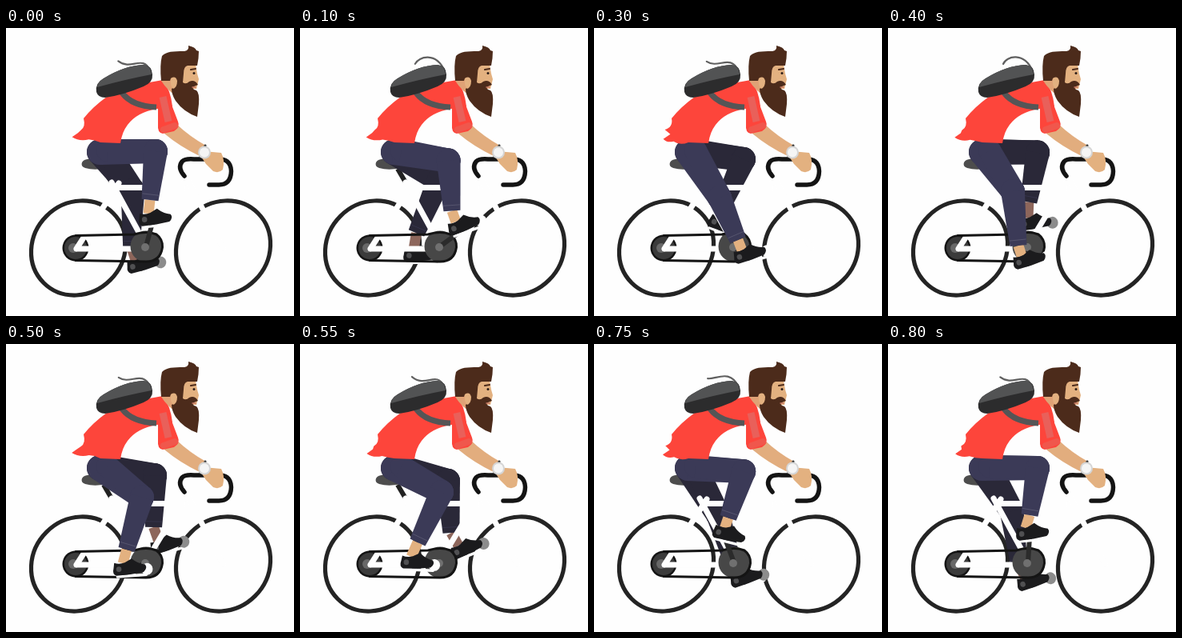
An HTML page with a canvas for the animation above (0.85 s loop, 360 px wide and 360 px high).

```html
<!DOCTYPE html>
<html lang="en">
<head>
<meta charset="utf-8">
<title>Cyclist</title>
<style>
  html, body { margin: 0; width: 100%; height: 100%; overflow: hidden; background: #fefefe; }
  canvas { display: block; }
</style>
</head>
<body>
<canvas id="stage" width="360" height="360"></canvas>
<script>
const ctx = document.getElementById('stage').getContext('2d');
const LOOP = 850, STEP = 50, TAU = Math.PI * 2;
const WHITE = '#fefefe', BLACK = '#141414', RED = '#fd453b', SKIN = '#e3b180', HAIR = '#4c2b1b';
const CRANK = { x: 175, y: 273 };

// time, knee x y, hem x y, shoe x y, shoe angle in degrees
const POSES = [
  [0, 187, 154, 180, 215, 178, 230, -4],
  [125, 185, 169, 192, 232, 198, 243, -20],
  [200, 182, 181, 194, 241, 199, 252, -18],
  [240, 170, 198, 186, 254, 193, 267, -9],
  [300, 157, 212, 180, 265, 185, 276, -14],
  [400, 156, 204, 163, 272, 167, 283, -13],
  [550, 177, 185, 147, 248, 139, 264, 4],
  [650, 185, 174, 152, 232, 145, 240, 20],
  [725, 187, 162, 163, 220, 159, 229, 24],
  [800, 187, 155, 177, 214, 172, 228, -4]
];

const mix = (a, b, k) => a + (b - a) * k;

// Smooth periodic curve through the poses
function poseAt(time) {
  const t = time % LOOP, n = POSES.length;
  const key = i => {
    const lap = Math.floor(i / n), p = POSES[i - lap * n];
    return [p[0] + lap * LOOP, ...p.slice(1)];
  };
  let i = n - 1;
  while (POSES[i][0] > t) i--;
  const [a, b, c, d] = [key(i - 1), key(i), key(i + 1), key(i + 2)];
  const span = c[0] - b[0], u = (t - b[0]) / span, u2 = u * u, u3 = u2 * u;
  const v = b.map((_, k) => {
    const m0 = (c[k] - a[k]) / (c[0] - a[0]) * span;
    const m1 = (d[k] - b[k]) / (d[0] - b[0]) * span;
    return (2 * u3 - 3 * u2 + 1) * b[k] + (u3 - 2 * u2 + u) * m0 +
      (3 * u2 - 2 * u3) * c[k] + (u3 - u2) * m1;
  });
  return {
    knee: { x: v[1], y: v[2] }, hem: { x: v[3], y: v[4] },
    shoe: { x: v[5], y: v[6] }, angle: v[7] * Math.PI / 180
  };
}

// The far leg pedals half a turn behind and hangs a little lower
function farPoseAt(t) {
  const pose = poseAt(t + LOOP / 2);
  pose.knee.y += 2;
  pose.hem.x -= 3;
  pose.hem.y += 4;
  pose.shoe.y += 7;
  return pose;
}

function fill(path, color) {
  ctx.fillStyle = color;
  ctx.fill(new Path2D(path));
}

function stroke(path, color, width, cap = 'round') {
  ctx.strokeStyle = color;
  ctx.lineWidth = width;
  ctx.lineCap = cap;
  ctx.lineJoin = 'round';
  ctx.stroke(new Path2D(path));
}

function disc(x, y, r, color) {
  ctx.fillStyle = color;
  ctx.beginPath();
  ctx.arc(x, y, r, 0, TAU);
  ctx.fill();
}

const line = (a, b, color, width, cap) =>
  stroke(`M${a.x} ${a.y}L${b.x} ${b.y}`, color, width, cap);

// Tapered limb; its far end is round unless flat is set
function limb(a, ra, b, rb, color, flat) {
  const len = Math.hypot(b.x - a.x, b.y - a.y);
  const nx = -(b.y - a.y) / len, ny = (b.x - a.x) / len;
  disc(a.x, a.y, ra, color);
  if (!flat) disc(b.x, b.y, rb, color);
  fill(`M${a.x + nx * ra} ${a.y + ny * ra}L${b.x + nx * rb} ${b.y + ny * rb}` +
    `L${b.x - nx * rb} ${b.y - ny * rb}L${a.x - nx * ra} ${a.y - ny * ra}Z`, color);
}

function pedalOf({ shoe, angle }) {
  const c = Math.cos(angle), s = Math.sin(angle);
  return { x: shoe.x + 4 * c - 14 * s, y: shoe.y + 4 * s + 14 * c };
}

function drawLeg(pose, cloth, cuff, skin, toe) {
  const { knee, hem, shoe, angle } = pose;
  line(hem, { x: shoe.x, y: shoe.y + 2 }, skin, 13, 'butt');
  limb({ x: 117, y: 155 }, 16, knee, 15, cloth);
  limb({ x: 127, y: 153 }, 14, knee, 15, cloth);
  limb(knee, 15, hem, 10.5, cloth, true);

  const len = Math.hypot(hem.x - knee.x, hem.y - knee.y);
  const dx = (hem.x - knee.x) / len, dy = (hem.y - knee.y) / len;
  const cx = hem.x - dx * 7, cy = hem.y - dy * 7;
  line({ x: cx - dy * 10, y: cy + dx * 10 }, { x: cx + dy * 10, y: cy - dx * 10 }, cuff, 1);

  ctx.save();
  ctx.translate(shoe.x, shoe.y);
  ctx.rotate(angle);
  ctx.scale(1.1, 1.15);
  stroke('M-7 16L26 15', WHITE, 3);
  disc(27, 9, 6.5, toe);
  fill('M-10 1Q-4 3 2 1L10-3Q17 3 25 4Q28 8 23 12L8 14L-8 15Q-13 13-11 7Z', '#1b1b1d');
  disc(-5, 8, 3, '#505052');
  ctx.restore();
}

function drawWheels() {
  ctx.strokeStyle = '#242424';
  ctx.lineWidth = 5.2;
  for (const x of [90.5, 271.5]) {
    ctx.beginPath();
    ctx.ellipse(x, 275, 61.5, 56.5, -TAU / 8, 0, TAU);
    ctx.stroke();
  }
  disc(87, 275, 16.5, BLACK);
  disc(87, 275, 14, '#3b3b3b');
  disc(84, 275, 6, '#686868');
}

function drawSaddle() {
  stroke('M122 176L132 193', '#222', 6, 'butt');
  fill('M95 168Q98 163 108 164L136 167Q139 171 130 174Q112 179 99 175Q93 173 95 168Z', '#4d4d4d');
}

function drawFrame() {
  stroke('M88 276L141 194M88 276H172M132 193L174 270M140 199.5H220M222 194L176 270M222 180L271 275', WHITE, 7);
}

function drawDrive(near) {
  disc(CRANK.x, CRANK.y, 19.5, '#474747');
  stroke('M87 259.5L160 258Q176 253 188 258Q196 264 195.500 274Q193 292 175 292L87 290.500', BLACK, 3);
  line(CRANK, pedalOf(near), '#2b2b2b', 6);
  disc(174, 274, 5, '#707070');
}

function drawHandlebar() {
  stroke('M223 185Q214 175 220 167Q224 163 235 164L262 164Q281 162 281.500 179Q281 196 266 196L254 196', BLACK, 5.5);
}

function drawArm() {
  fill('M198 126L213 120Q230 136 250 147L242 160Q217 148 198 132Z', '#e2ad7e');
  fill('M247 154L269 156Q274 165 271 177Q266 182 259 179L250 170L244 161Z', SKIN);
  stroke('M249 147L243 161', '#373737', 3);
  disc(248, 155.5, 8, '#d5d5d5');
  disc(248, 155.5, 6, '#f5f5f5');
}

function drawShirt(t) {
  const flap = (Math.cos(TAU * (t - 260) / 425) + 1) / 2;
  const at = (x0, y0, x1, y1) => `${mix(x0, x1, flap)} ${mix(y0, y1, flap)}`;
  fill('M196 65Q206 78 208 98L189 101Q164 105 152 121Q145 130 143 144L118 143' +
    `Q${at(111, 139, 107, 148)} ${at(104, 139, 99, 142)}` +
    `Q${at(92, 142, 91, 144)} ${at(82, 136, 87, 139)}` +
    `L${at(89, 131, 96, 133)}L${at(94, 128, 88, 127)}` +
    `Q${at(100, 124, 99, 124)} 97 113Q109 98 126 86Q160 70 196 65Z`, RED);
  fill('M190 78Q198 74 204 88L215 117Q218 124 210 129L196 132Q189 131 190 121Z', RED);
  stroke('M196 86L203 117', '#e9605a', 9, 'butt');
  stroke('M197 127L211 122', '#f0574c', 8);
}

function drawPack(t) {
  const lift = (Math.cos(TAU * 3 * (t - 400) / LOOP) + 1) / 2;
  const y = (low, high) => mix(low, high, lift);
  stroke(`M${y(140, 144)} ${y(41, 45)}C${y(158, 148)} ${y(56, 35)} ${y(170, 170)} ${y(32, 29)} 181 54`, '#606060', 2.2);
  stroke('M145 81Q158 98 188 99', '#555556', 7, 'butt');
  fill('M113 80Q111 69 122 63Q148 47 172 46Q182 47 183 58Q184 68 172 73Q146 84 124 87Q115 87 113 80Z', '#2c2c2d');
  fill('M114 74Q115 67 122 63Q148 47 172 46Q181 47 182 58Q150 64 114 74Z', '#525354');
}

function drawHead() {
  fill('M196 58L216 58L213 84Q203 80 194 66Z', '#dfa276');
  fill('M211 40H236L239 57L241 64L238 76H214Z', SKIN);
  fill('M194 66Q192 46 195 35Q200 28 223 29Q229 28 228 22Q237 24 238 28L241 29Q241 38 239 47L227 47' +
    'Q222 48 222 57L221 68Q225 71 229 67Q236 64 240 71L235 73Q231 76 238 78Q242 81 241 95' +
    'L239 111Q222 105 212 91Q207 83 207 76L210 74L210 62L206 63L205 66Z', HAIR);
  fill('M206 63Q212 59 214 66Q214 74 209 76Q205 72 206 63Z', SKIN);
  stroke('M231 52L237 51', HAIR, 2);
  disc(235, 56.5, 1.5, '#2a1c17');
  stroke('M233 74H237', '#c77a65', 1.5);
}

function draw(t) {
  const near = poseAt(t), far = farPoseAt(t);
  ctx.fillStyle = WHITE;
  ctx.fillRect(0, 0, 360, 360);
  drawWheels();
  drawSaddle();
  line(CRANK, pedalOf(far), '#242424', 6);
  drawLeg(far, '#2a2838', '#35334a', '#8d665b', '#8c8c8c');
  drawFrame();
  drawDrive(near);
  drawLeg(near, '#3b3a57', '#56556e', SKIN, WHITE);
  drawHandlebar();
  drawArm();
  drawShirt(t);
  drawPack(t);
  drawHead();
}

function tick() {
  draw(Math.floor(performance.now() % LOOP / STEP) * STEP);
  requestAnimationFrame(tick);
}
tick();
</script>
</body>
</html>
```
